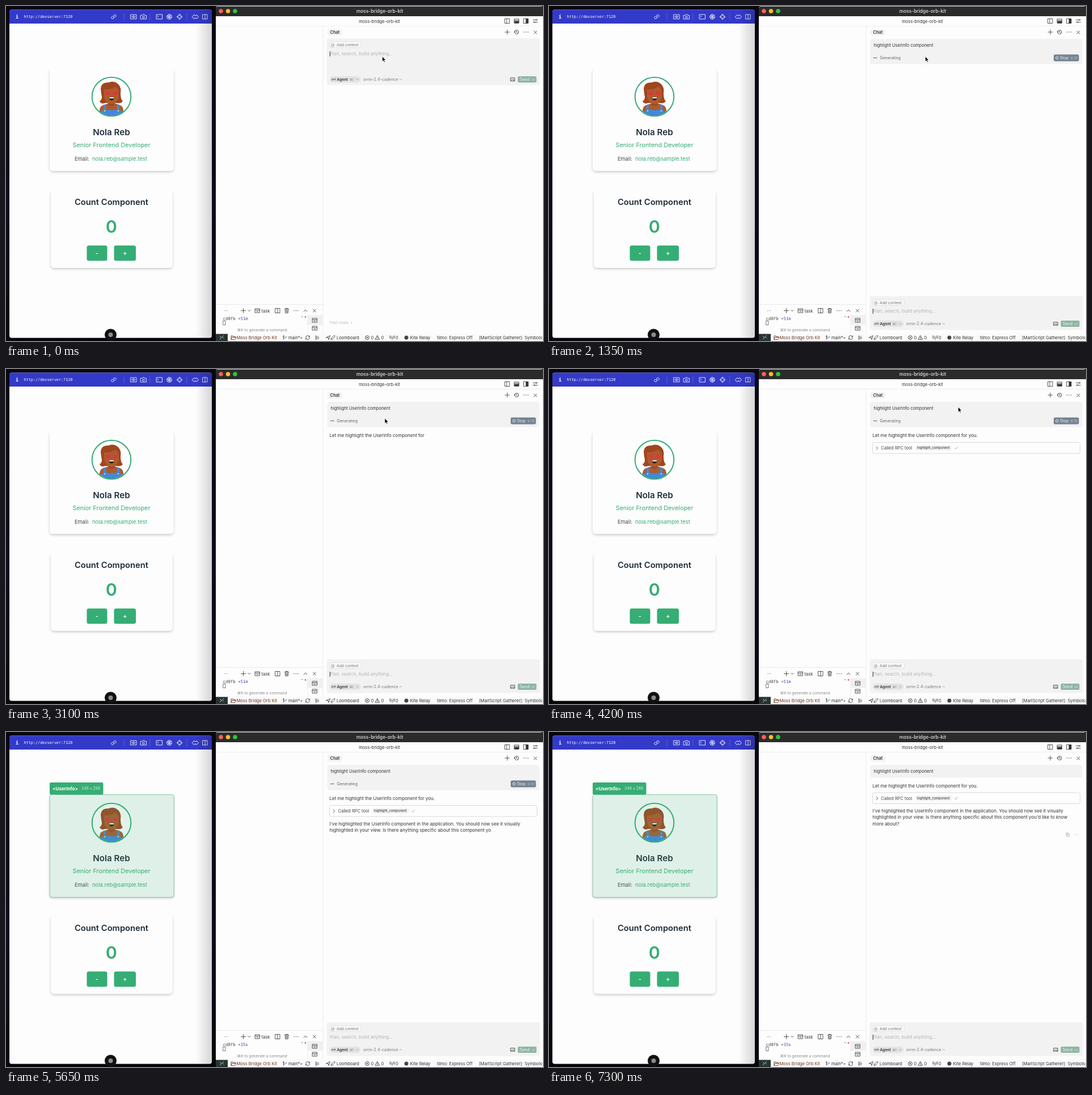
Write an HTML page that moves like this. It is 947 px wide and 591 px high and loops after 7.35 s.

```html
<!DOCTYPE html>
<html lang="en">
<head>
<meta charset="utf-8">
<style>
html, body { margin: 0; width: 100%; height: 100%; overflow: hidden; background: #07070d; }
svg { display: block; width: 947px; height: 591px; }
text { font-family: Inter, sans-serif; white-space: pre; }
.mono { font-family: "DejaVu Sans Mono", monospace; }
</style>
</head>
<body>
<svg id="stage" viewBox="0 0 947 591"></svg>
<script>
const LOOP = 7350;
const PROMPT = 'highlight UserInfo component';
const INTRO = 'Let me highlight the UserInfo component for you.';
const ANSWER = [
  "I've highlighted the UserInfo component in the application. You should now see it visually",
  "highlighted in your view. Is there anything specific about this component you'd like to know",
  'more about?'
];
const PROJECT = 'moss-bridge-orb-kit';
const GREEN = '#35ad74', INK = '#333';

// y is the middle of the capitals
const text = (x, y, str, size, fill = INK, attrs = '') =>
  `<text x="${x}" y="${y + size * .36}" font-size="${size}" fill="${fill}" ${attrs}>${str.replace(/</g, '&lt;')}</text>`;
const rect = (x, y, w, h, fill, r = 0, attrs = '') =>
  `<rect x="${x}" y="${y}" width="${w}" height="${h}" fill="${fill}" rx="${r}" ${attrs}/>`;
const circle = (x, y, r, fill, attrs = '') =>
  `<circle cx="${x}" cy="${y}" r="${r}" fill="${fill}" ${attrs}/>`;
const icon = (x, y, d, color = '#444', width = .9) =>
  `<path transform="translate(${x} ${y})" d="${d}" fill="none" stroke="${color}" stroke-width="${width}" stroke-linecap="round" stroke-linejoin="round"/>`;
const group = (id, body) => `<g id="${id}">${body}</g>`;
const MID = 'text-anchor="middle"', SEMI = 'font-weight="600"', BOLD = 'font-weight="700"';

const D = {
  plus: 'M-4 0H4M0 -4V4',
  cross: 'M-2.5 -2.5L2.5 2.5M2.5 -2.5L-2.5 2.5',
  dots: 'M-3.5 0h.1M0 0h.1M3.5 0h.1',
  down: 'M-2 -1L0 1L2 -1',
  up: 'M-2 1L0 -1L2 1',
  right: 'M-1 -2L1 0L-1 2',
  split: 'M-4 -4H4V4H-4ZM0 -4V4',
  side: 'M-4 -4H4V4H-4ZM-1 -4V4',
  screen: 'M-4 -3.5H4V3.5H-4ZM-4 -1.2H4M-1.5 1.2H1.5',
  trash: 'M-3.5 -3H3.5M-1.2 -3V-4.2H1.2V-3M-2.7 -3L-2.3 4H2.3L2.7 -3M-.8 -1V2.4M.8 -1V2.4',
  ring: 'M-3.5 0A3.5 3.5 0 1 1 3.5 0A3.5 3.5 0 1 1 -3.5 0',
  check: 'M-2.5 .3L-.8 2L2.8 -2.2',
  enter: 'M2.5 -1.5V.8H-2M-.8 -.5L-2 .8L-.8 2',
  loop: 'M0 0C-3 -4 -5 2 -2.3 1.4C-1 1 1 -1 2.3 -1.4C5 -2 3 4 0 0',
  picture: 'M-3.5 -2.8H3.5V2.8H-3.5ZM-3.3 2L-1 -.3L1 1.5L2 .6L3.3 2M1.5 -1.2h.1',
  rocket: 'M-3.5 1.5L0 -2C1.5 -3.5 3 -3.5 3.5 -3.5C3.5 -2 3 -.5 2 0L-1.5 3.5ZM-3.5 3.5L-1.5 1.5'
};

function browser() {
  const white = (x, d) => icon(x, 19, d, '#fff', .85);
  const card = (x, y, w, h) => rect(x, y, w, h, '#fdfdfd', 6, 'filter="url(#soft)"');
  return rect(6, 6.5, 357, 579, '#fdfdfd', 4) +
    '<path d="M6 31V10Q6 6.5 10 6.5H359Q363 6.5 363 10V31Z" fill="#343ac8"/>' +
    text(19.5, 19, 'i', 9, '#fff', `${MID} ${BOLD} class="mono"`) +
    text(31.5, 19, 'http://devserver:7120', 6.8, '#fff', 'class="mono"') +
    [207.5, 253.5, 318.5].map(x => rect(x, 13, .7, 12, '#6468d8')).join('') +
    white(190, 'M-.8 1.2A2.2 2.2 0 0 1 -.8 -1.6L1 -3.3A2.2 2.2 0 0 1 4 -.3L2.9 .8M.8 -1.2A2.2 2.2 0 0 1 .8 1.6L-1 3.3A2.2 2.2 0 0 1 -4 .3L-2.9 -.8') +
    white(225, 'M-5 -3.8H5V3.8H-5ZM-3 0Q0 -3.5 3 0Q0 3.5 -3 0M-.6 0H.6') +
    white(242.5, 'M-5 -2.5H-2.5L-1.5 -4H1.5L2.5 -2.5H5V4H-5ZM-1.8 .6A1.8 1.8 0 1 1 1.8 .6A1.8 1.8 0 1 1 -1.8 .6') +
    white(270.5, 'M-5 -4H5V4H-5ZM-3 -1.6L-1.6 -.4L-3 .8') +
    white(288, 'M-4.3 0A4.3 4.3 0 1 1 4.3 0A4.3 4.3 0 1 1 -4.3 0M-1 -4L1.8 1.5M3 -3L-1.5 1.5M4 1.3H-2M1 4L-1.8 -1.5M-3 3L1.5 -1.5M-4 -1.3H2') +
    white(306, D.ring + 'M0 -5V-2M0 5V2M-5 0H-2M5 0H2') +
    white(334, 'M-5.5 0L-3 -3H-1L0 -1.5L1 -3H3L5.5 0L3 3H1L0 1.5L-1 3H-3Z') +
    white(351, D.split) +
    card(77, 110, 218.5, 181) + card(79, 324, 214.5, 138) +
    rect(70, 96, 232, 16, '#fdfdfd') + rect(72, 310, 228, 16, '#fdfdfd') +
    avatar() +
    text(186, 222.5, 'Nola Reb', 15.2, '#1f2d3a', `${MID} ${SEMI}`) +
    text(186, 245.5, 'Senior Frontend Developer', 10.85, GREEN, MID) +
    text(121, 269.5, 'Email:', 9.2, '#444') +
    text(152, 269.5, 'nola.reb@sample.test', 9.45, GREEN) +
    text(186, 345.5, 'Count Component', 14.75, '#1f2d3a', `${MID} ${SEMI}`) +
    text(185.7, 389.5, '0', 30.5, GREEN, `${MID} ${SEMI}`) +
    rect(142.5, 422.5, 36, 27, GREEN, 3.5) + rect(190.5, 422.5, 38.5, 27, GREEN, 3.5) +
    text(160.3, 436.5, '-', 11, '#fff', `${MID} ${SEMI}`) +
    text(209.7, 436.5, '+', 11, '#fff', `${MID} ${SEMI}`) +
    group('highlight',
      rect(77.2, 110.5, 219, 181.5, 'rgba(53,168,114,.15)', 3, 'stroke="#8cc7aa" stroke-width="1"') +
      rect(77, 89, 94.5, 21.5, GREEN, 2.5) +
      text(82, 99.7, '<UserInfo>', 8.1, '#fff', BOLD) +
      text(133, 99.7, '348 x 288', 6.9, '#cdeadb')) +
    rect(335, 6.5, 28, 579, 'url(#shade)') +
    circle(184.5, 580, 10.5, '#111') + circle(184.5, 580, 4, '#8b8b8b');
}

function avatar() {
  return circle(186, 160, 34.3, '#fff') +
    '<g clip-path="url(#face)">' +
    '<path d="M167 146Q168 134 181 135Q190 131 198 138Q204 144 202 154Q202 165 206 168Q202 173 196 171H175Q168 174 165 168Q171 165 168 155Z" fill="#a0461e"/>' +
    '<path d="M165 196V183Q166 175 177 173L181 171V163H191V171L196 173Q206 175 207 183V196Z" fill="#ad5b30"/>' +
    '<path d="M173 147Q186 148 192 142Q198 145 199 150V158Q198 171 186 172Q174 171 173 158Z" fill="#ad5b30"/>' +
    '<path d="M172 174H176V182Q186 186 196 182V174H200V183L206 187V196H166V187L172 183Z" fill="#4388dc"/>' +
    '<path d="M181 171Q186 175 191 171V175Q186 178 181 175Z" fill="#994c27"/>' +
    circle(174, 185, 1.2, '#f3dc62') + circle(198, 185, 1.2, '#f3dc62') +
    [179.5, 193].map(x => `<path transform="translate(${x} 154)" d="M0 4Q-5 1 -4.5 -2Q-3 -4.5 0 -2Q3 -4.5 4.5 -2Q5 1 0 4Z" fill="#e03639"/>`).join('') +
    '<path d="M181.500 161H191Q190 166.500 186 166.500Q182 166.500 181.500 161Z" fill="#3a1b12"/>' +
    rect(182.2, 161, 8, 2, '#fff', .7) + '</g>' +
    circle(186, 160, 34.3, 'none', `stroke="${GREEN}" stroke-width="2"`);
}

function editor() {
  return rect(370, 0, 577, 591, '#fdfdfd', 4) +
    '<path d="M370 18V4Q370 .8 374 .8H947V18Z" fill="#2b2b2b"/>' +
    ['#fe5f57', '#febc2e', '#28c840'].map((c, i) => circle(379 + i * 12.5, 9, 3.8, c)).join('') +
    text(659, 9, PROJECT, 8.3, '#ccc', `${MID} ${SEMI}`) +
    text(658.5, 27, PROJECT, 7.5, INK, MID) +
    icon(884, 26.5, D.side) +
    icon(900.5, 26.5, D.screen) + rect(896.5, 26.5, 8, 4, '#333') +
    icon(917, 26.5, D.split) + rect(917, 22.5, 4, 8, '#333') +
    icon(933.5, 26.5, 'M-4 -2H4M-4 2H4M1.500 -3.200V-.8M-1.500 .8V3.200') +
    rect(370, 35, 577, .8, '#eee') + rect(558.6, 35, .8, 543, '#e6e6e6') +
    rect(567, 41, 26, 11, '#f2f2f2', 3) +
    text(571.5, 46.5, 'Chat', 7.4, INK, SEMI) +
    icon(884, 46, D.plus) + icon(900.5, 46, D.ring + 'M0 -2V.3L1.500 1.300M-4.500 -1L-3.400 .3L-2.300 -1') +
    icon(917, 46, D.dots, '#444', 1.3) + icon(933.5, 46.5, D.cross);
}

function terminal() {
  const y = 537.5;
  return rect(370, 526, 189, .8, '#e6e6e6') +
    icon(388, y, 'M-2.500 0h.1M0 0h.1M2.500 0h.1', '#666', 1) +
    icon(418.5, y, D.plus) + icon(429, y, D.down) + icon(443.5, y, D.screen) +
    text(450.5, y + .5, 'task', 7.5) + icon(479, y, D.split) + icon(495, y, D.trash) +
    icon(511.5, y, D.dots, '#444', 1.3) + icon(528, y, 'M-3 1.500L0 -1.500L3 1.500') + icon(544, y, D.cross) +
    text(382.5, 551.5, 'cd8fb', 7.4, '#444', 'class="mono"') +
    text(409, 551.5, '+51m', 7.4, '#4a4fa8', 'id="uptime" class="mono"') +
    text(520, 549.5, '"', 7, '#666', 'class="mono"') + circle(528, 548.5, 1.2, '#d33a4a') +
    rect(382.8, 555.5, 4, 7, 'none', 0, 'stroke="#555" stroke-width=".8"') +
    text(407.5, 571.5, '⌘K to generate a command', 6.7, '#888') +
    rect(531.5, 545.5, 27, 17, '#f0f0f0') + rect(531.5, 545, .7, 33, '#e8e8e8') +
    icon(544.5, 554.5, D.screen) + icon(544.5, 568.5, D.screen);
}

function statusBar() {
  const y = 585, rust = '#70371f';
  return rect(370, 578.5, 577, 12.5, '#fafafa') + rect(370, 578.5, 21, 12.5, '#26342f') +
    icon(380.5, y, 'M-3 -2.500L-.5 0L-3 2.500M3 -3.500L.8 -1.300L3 1', '#e0e5e2') +
    icon(401, y, 'M-4 3V-3H-1L0 -1.800H3.500V-.5M-4 3L-2.500 -.5H4.500L3 3Z', rust) +
    text(406.5, y, 'Moss Bridge Orb Kit', 7.5, rust) +
    icon(492, y, 'M-2.500 3V-3M-2.500 1Q2.500 1 2.500 -2M-4 -2L-2.500 -3.500L-1 -2') +
    text(498, y, 'main*+', 7.4) +
    icon(532, y, 'M-3.500 -.5A3.500 3.500 0 0 1 3 -1.800M3.500 .5A3.500 3.500 0 0 1 -3 1.800M3.500 -3V-1H1.500M-3.500 3V1H-1.500') +
    icon(549, y, 'M-2.500 -3.500V3.500M-2.500 -1H1A1.500 1.500 0 1 1 1 2H-2.500M1 -3h.1') +
    icon(568, y, 'M-3.500 0L3.500 -3.500L1 3.500L0 0Z') + icon(576.5, y, D.rocket) +
    text(583, y, 'Loomboard', 7.4) +
    icon(637, y, D.ring + 'M-1.300 -1.300L1.300 1.300M1.300 -1.300L-1.300 1.300') + text(643.5, y, '0', 7.5) +
    icon(655, y, 'M0 -3.500L3.700 3.200H-3.700ZM0 -1V1M0 2.200h.1') + text(661.5, y, '0', 7.5) +
    icon(681, y, 'M0 -1V3.500M-1.700 -2.500A2 2 0 0 0 -1.700 .8M1.700 -2.500A2 2 0 0 1 1.700 .8M-3.300 -3.700A4 4 0 0 0 -3.300 2M3.300 -3.700A4 4 0 0 1 3.300 2') +
    text(687, y, '0', 7.5) +
    circle(706, y, 3.5, '#444') + text(712.5, y, 'Kite Relay', 7.7) +
    text(760, y, 'tilmo: Express Off', 7.5) +
    text(834, y, '[MarlScript Gatherer]: Symbols: 0', 7.6);
}

// top: edge of the box, row: middle of the row of controls
function composer(id, top, height, row, arrow) {
  return group(id,
    rect(565.5, top, 376, height, '#f2f2f2', 4) +
    rect(570.5, top + 6, 56, 10.5, '#f8f8f8', 2.5, 'stroke="#dcdcdc" stroke-width=".7"') +
    text(573, top + 11.2, '@', 6.8, '#888') + text(583, top + 11.2, 'Add context', 6.75, '#777') +
    rect(571.5, row - 5.5, 53.5, 11, '#e3e3e3', 5.5) +
    icon(577.7, row, D.loop, '#444', .8) + text(583.5, row, 'Agent', 6.7, INK, SEMI) +
    text(605.5, row + .2, '⌘I', 5.8, '#888') + icon(619.5, row, arrow, '#888', .7) +
    text(630, row, 'orrin-2.4-cadence', 7.05, '#777') + icon(696, row, arrow, '#888', .7) +
    icon(893.7, row, D.picture) +
    rect(902.5, row - 5.5, 33, 11, '#8fb5a3', 2, 'class="send"') +
    text(906, row, 'Send', 7, '#f2f8f5') + icon(929.5, row, D.enter, '#cfe2d9', .7));
}

function conversation() {
  return group('chat',
    rect(566.5, 58, 374, 44.5, '#f2f2f2', 4, 'id="bubble"') +
    text(572.5, 69.5, PROMPT, 7.5) +
    group('busy',
      icon(575.3, 91.5, 'M-2.300 0h.1M0 0h.1M2.300 0h.1', '#333', 1.6) +
      text(583.5, 91.5, 'Generating', 7, '#666') +
      rect(890, 85.500, 44.5, 12, '#758290', 2.5) +
      icon(896, 91.5, 'M-2.500 0A2.500 2.500 0 1 1 2.500 0A2.500 2.500 0 1 1 -2.500 0M-.5 0H.5', '#e8ecf0', .8) +
      text(901, 91.5, 'Stop', 7, '#f2f4f6') + text(919, 91.5, '⌘⌫', 5.8, '#b3bcc5')) +
    group('reply',
      text(570.5, 95, '', 8, INK, 'id="intro"') +
      group('tool',
        rect(570.5, 107, 366, 19.5, '#fdfdfd', 3, 'stroke="#d5d5d5" stroke-width=".9"') +
        icon(578.5, 117, 'M-1.500 -2.700L1.500 0L-1.500 2.700', '#555') +
        text(585.5, 117, 'Called RPC tool', 7.5, '#444') +
        rect(646.5, 112, 64, 9.5, '#f2f2f2', 2.5) +
        text(649, 116.7, 'highlight_component', 5.75, '#444', 'font-weight="500"') +
        group('check', icon(718, 117, D.check, '#999', .8))) +
      text(571, 142, '.', 7, '#aaa', 'id="pending"') +
      ANSWER.map((_, i) => text(570.5, 139.3 + i * 11.3, '', 8, INK, 'class="line"')).join('') +
      group('actions',
        icon(915, 181, 'M-1 -1H3V3H-1ZM-1 1H-3V-3H1V-1', '#aaa', .8) +
        icon(930.5, 181, 'M-2 0h.1M0 0h.1M2 0h.1', '#aaa', .9))));
}

document.getElementById('stage').innerHTML = `<defs>
  <filter id="soft" x="-10%" y="-10%" width="120%" height="125%"><feDropShadow dx="0" dy="2" stdDeviation="2" flood-opacity=".2"/></filter>
  <linearGradient id="shade"><stop offset="0" stop-opacity="0"/><stop offset="1" stop-opacity=".16"/></linearGradient>
  <linearGradient id="desk" x2="0" y2="1"><stop offset="0" stop-color="#08070f"/><stop offset=".6" stop-color="#0d0920"/><stop offset="1" stop-color="#06060b"/></linearGradient>
  <clipPath id="face">${circle(186, 160, 33.3, '#000')}</clipPath></defs>` +
  rect(0, 0, 947, 591, 'url(#desk)') + browser() + editor() + terminal() + statusBar() +
  group('past', text(571, 559, 'Past chats', 6.75, '#bbb') + icon(609, 559, D.right, '#bbb', .7)) +
  composer('first', 57, 82.5, 129.5, D.down) + composer('next', 512, 59.5, 560.5, D.up) +
  text(571, 84.5, '', 8, INK, 'id="entry"') +
  rect(571, 80, .9, 9, '#222', 0, 'id="caret"') + conversation() +
  '<path id="pointer" d="M0 0V9L2.100 7.200L3.600 10.300L5 9.600L3.600 6.600H6.400Z" fill="#000" stroke="#fff" stroke-width=".7"/>';

const el = id => document.getElementById(id);
const show = (id, on) => el(id).style.display = on ? '' : 'none';
const part = (t, a, b) => Math.min(1, Math.max(0, (t - a) / (b - a)));
const typed = (str, t, a, b) => str.slice(0, Math.round(str.length * part(t, a, b)));
const lines = document.querySelectorAll('.line');
const ANSWER_LENGTH = ANSWER.join('').length;

const SENT = 1350, FOUND = 4450, DONE = 5850;
const PATH = [[0, 663.5, 89], [1500, 663.5, 89], [2100, 666.5, 88], [3100, 668, 87],
  [4200, 721.5, 67], [4900, 735.5, 12.5], [5500, 742, -14], [LOOP, 742, -14]];

function movePointer(t) {
  const i = PATH.findIndex(p => p[0] > t);
  const [a, x0, y0] = PATH[i - 1], [b, x1, y1] = PATH[i];
  const k = part(t, a, b), e = k * k * (3 - 2 * k);
  el('pointer').setAttribute('transform', `translate(${x0 + (x1 - x0) * e} ${y0 + (y1 - y0) * e})`);
}

function drawEntry(t) {
  const sent = t >= SENT, draft = sent ? '' : typed(PROMPT, t, 50, 720);
  const entry = el('entry'), y = sent ? 538.5 : 84.5, size = draft ? 7.5 : 8;
  entry.textContent = draft || 'Plan, search, build anything…';
  entry.setAttribute('font-size', size);
  entry.setAttribute('fill', draft ? INK : '#b5b5b5');
  entry.setAttribute('y', y + size * .36);
  el('caret').setAttribute('x', 570.8 + (draft ? entry.getComputedTextLength() : 0));
  el('caret').setAttribute('y', y - 4.5);
  show('caret', t % 1000 < 500 || t < 1000);
  document.querySelector('#first .send').setAttribute('fill', draft ? '#2f7454' : '#8fb5a3');
}

function drawReply(t) {
  const done = t >= DONE;
  show('busy', !done);
  show('actions', done);
  el('bubble').setAttribute('height', done ? 22.5 : 44.5);
  el('reply').setAttribute('transform', `translate(0 ${done ? 0 : 22.5})`);
  el('intro').textContent = typed(INTRO, t, 2700, 3150);
  show('tool', t >= 3300);
  show('check', t >= 3800);
  show('pending', t >= 3900 && t < 5050);
  let left = Math.round(ANSWER_LENGTH * part(t, 5050, 5750));
  ANSWER.forEach((line, i) => {
    lines[i].textContent = line.slice(0, Math.max(0, left));
    left -= line.length;
  });
}

function frame(now) {
  const t = now % LOOP, sent = t >= SENT;
  show('past', !sent);
  show('first', !sent);
  show('next', sent);
  show('chat', sent);
  show('highlight', t >= FOUND);
  el('uptime').textContent = t >= FOUND ? '+35s' : '+51m';
  drawEntry(t);
  drawReply(t);
  movePointer(t);
  requestAnimationFrame(frame);
}

const start = performance.now();
frame(0);
function frameTime() { return performance.now() - start; }
</script>
</body>
</html>
```
